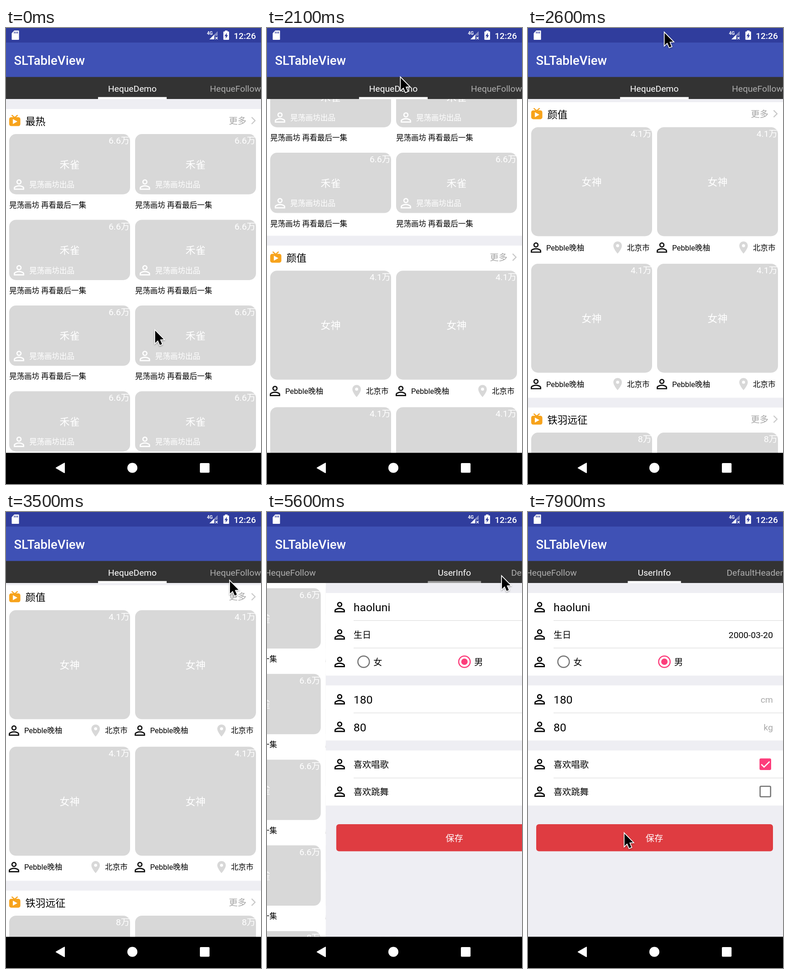
Animation of 559 by 1002 pixels, one loop 8 s. Source, as an HTML page with a canvas:

```html
<!DOCTYPE html>
<html lang="zh-CN">
<head>
<meta charset="utf-8">
<title>SLTableView</title>
<style>
html, body { margin: 0; width: 100%; height: 100%; overflow: hidden; background: #000; }
canvas { display: block; width: 559px; height: 1002px; }
</style>
</head>
<body>
<canvas id="stage"></canvas>
<script>
const W = 559, H = 1002, LOOP = 8000, STEP = 100;
const LEFT = -5, PAGE_W = 564, MID = 277;
const TOP = 156, BOTTOM = 933.5;
const GRAY = '#eeeef3', CARD = '#d8d8d8', PINK = '#fc3d7b', ORANGE = '#f7a31c';
const FONT = 'Roboto, "Noto Sans CJK SC", "Noto Sans CJK", sans-serif';
const SMALL = 16.5, BODY = 19.25, TITLE = 22, INPUT = 24.75;
const COLS = [7, 283];
const TABS = ['HequeDemo', 'HequeFollow', 'UserInfo', 'DefaultHeader'];

const canvas = document.getElementById('stage');
const g = canvas.getContext('2d');
const dpr = window.devicePixelRatio || 1;
canvas.width = W * dpr;
canvas.height = H * dpr;

const PERSON = new Path2D('M12 5.9a2.1 2.1 0 1 1 0 4.2a2.1 2.1 0 1 1 0-4.2m0 9c2.97 0 6.1 1.46 6.1 2.1v1.1H5.9V17c0-.64 3.13-2.1 6.1-2.1M12 4a4 4 0 1 0 0 8a4 4 0 1 0 0-8zm0 9c-2.67 0-8 1.34-8 4v3h16v-3c0-2.66-5.33-4-8-4z');
const PIN = new Path2D('M12 2C8.13 2 5 5.13 5 9c0 5.25 7 13 7 13s7-7.75 7-13c0-3.87-3.13-7-7-7zm0 9.5a2.5 2.5 0 1 1 0-5a2.5 2.5 0 1 1 0 5z');

// ---- helpers ----
const clamp01 = v => Math.min(1, Math.max(0, v));
const span = (t, a, b) => clamp01((t - a) / (b - a));
const smooth = u => u * u * (3 - 2 * u);
const mix = (a, b, u) => a + (b - a) * u;

function rect(x, y, w, h, color) {
  g.fillStyle = color;
  g.fillRect(x, y, w, h);
}

function roundRect(x, y, w, h, r, color) {
  g.fillStyle = color;
  g.beginPath();
  g.roundRect(x, y, w, h, r);
  g.fill();
}

function circle(x, y, r, color, line) {
  g.beginPath();
  g.arc(x, y, r, 0, Math.PI * 2);
  if (line) {
    g.lineWidth = line;
    g.strokeStyle = color;
    g.stroke();
  } else {
    g.fillStyle = color;
    g.fill();
  }
}

function trace(points) {
  g.beginPath();
  points.forEach(([x, y], i) => i ? g.lineTo(x, y) : g.moveTo(x, y));
}

function polygon(points, color) {
  trace(points);
  g.closePath();
  g.fillStyle = color;
  g.fill();
}

// Polygon with rounded corners, grown by half the line width.
function softPolygon(points, color, width) {
  polygon(points, color);
  g.lineJoin = 'round';
  g.strokeStyle = color;
  g.lineWidth = width;
  g.stroke();
  g.lineJoin = 'miter';
}

function polyline(points, color, width) {
  trace(points);
  g.strokeStyle = color;
  g.lineWidth = width;
  g.stroke();
}

function text(s, x, cy, size, color, align = 'left', weight = 400) {
  g.font = `${weight} ${size}px ${FONT}`;
  g.textAlign = align;
  g.fillStyle = color;
  g.fillText(s, x, cy + size * 0.37);
}

function icon(path, cx, cy, scale, color) {
  g.save();
  g.translate(cx, cy);
  g.scale(scale, scale);
  g.translate(-12, -12);
  g.fillStyle = color;
  g.fill(path, 'evenodd');
  g.restore();
}

const person = (cx, cy, color) => icon(PERSON, cx, cy, 1.43, color);

// ---- list pages ----
const SHOW = { h: 132.5, pitch: 188.4, rows: 4, tail: 50 };
const FACE = { h: 239.5, pitch: 300, rows: 2, tail: 55 };

function showCard(x, y, count) {
  roundRect(x, y, 265, SHOW.h, 15, CARD);
  text(count, x + 264, y + 14, BODY, '#fff', 'right');
  text('禾雀', x + 132.5, y + 66.5, TITLE, '#fff', 'center');
  person(x + 21.5, y + 111, '#fff');
  text('晃荡画坊出品', x + 44, y + 111, SMALL, '#fff');
  text('晃荡画坊 再看最后一集', x, y + 155.5, SMALL, '#000');
}

function faceCard(x, y, count) {
  const cy = y + 264.5;
  roundRect(x, y, 265, FACE.h, 15, CARD);
  text(count, x + 264, y + 14, BODY, '#fff', 'right');
  text('女神', x + 132.5, y + 120, TITLE, '#fff', 'center');
  person(x + 10.5, cy, '#111');
  text('Pebble晚柚', x + 33, cy, SMALL, '#000');
  icon(PIN, x + 189.5, cy, 1.33, CARD);
  text('北京市', x + 210, cy, SMALL, '#000');
}

function sectionHeader(y, title) {
  roundRect(7, y + 18, 24.5, 19.5, 4.5, ORANGE);
  polyline([[12.5, y + 13.5], [19, y + 19], [25.5, y + 13.5]], ORANGE, 2.4);
  polygon([[15, y + 22], [25, y + 27.5], [15, y + 33]], '#fff');
  text(title, 42.5, y + 26.5, TITLE, '#000');
  text('更多', 488.5, y + 25.5, BODY, '#a6a6a6');
  polyline([[538.5, y + 18], [546, y + 25.5], [538.5, y + 33]], '#c8c8c8', 2.2);
}

function section(y, title, kind, card, count) {
  const h = 55 + (kind.rows - 1) * kind.pitch + kind.h + kind.tail;
  rect(LEFT, y, PAGE_W, h, '#fff');
  sectionHeader(y, title);
  for (let r = 0; r < kind.rows; r++)
    for (const x of COLS) card(x, y + 55 + r * kind.pitch, count);
  return y + h + 21.6;
}

function demoPage(scroll) {
  rect(LEFT, TOP, PAGE_W, BOTTOM - TOP, GRAY);
  let y = 178 - scroll;
  y = section(y, '最热', SHOW, showCard, '6.6万');
  y = section(y, '颜值', FACE, faceCard, '4.1万');
  section(y, '铁羽远征', SHOW, showCard, '8万');
}

function followPage() {
  rect(LEFT, TOP, PAGE_W, BOTTOM - TOP, '#fff');
  for (let r = 0; r < 5; r++)
    for (const x of COLS) showCard(x, 167.4 + r * SHOW.pitch, r < 4 ? '6.6万' : '8万');
}

// ---- form page ----
function group(y, centers) {
  rect(LEFT, y, PAGE_W, centers.length * 60.5, '#fff');
  centers.forEach((cy, i) => {
    person(25.5, cy, '#000');
    if (i) rect(56, y + i * 60.4 - 0.5, W - 56, 1.2, '#dcdcdc');
  });
}

function infoPage() {
  rect(LEFT, TOP, PAGE_W, BOTTOM - TOP, GRAY);
  group(178, [209, 269, 329.5]);
  text('haoluni', 56, 208.5, INPUT, '#000');
  text('生日', 56, 269.5, BODY, '#000');
  text('2000-03-20', 537, 269.5, BODY, '#000', 'right');
  circle(78, 329, 12.6, '#757575', 2.5);
  text('女', 99.5, 330, BODY, '#000');
  circle(299, 329, 12.6, PINK, 2.5);
  circle(299, 329, 7, PINK);
  text('男', 320.5, 330, BODY, '#000');

  group(381, [411.5, 472]);
  text('180', 56, 412, INPUT, '#000');
  text('cm', 537, 412, BODY, '#aaa', 'right');
  text('80', 56, 473, INPUT, '#000');
  text('kg', 537, 473, BODY, '#aaa', 'right');

  group(524, [554, 614.5]);
  text('喜欢唱歌', 56, 554.5, BODY, '#000');
  text('喜欢跳舞', 56, 615, BODY, '#000');
  roundRect(507.5, 541.5, 25.5, 25.5, 3, PINK);
  polyline([[511.5, 554.5], [517.5, 560.5], [529.5, 548.5]], '#fff', 2.6);
  g.beginPath();
  g.roundRect(508.8, 602.8, 23, 23, 2);
  g.strokeStyle = '#757575';
  g.lineWidth = 2.6;
  g.stroke();

  roundRect(18, 686, 519, 59.5, 6, '#df3c41');
  text('保存', MID, 716.5, BODY, '#fff', 'center');
}

// ---- fixed bars ----
function statusBar() {
  rect(0, 0, W, 32, '#303d9d');
  softPolygon([[13.5, 12], [18.5, 6.5], [27.5, 6.5], [27.5, 25], [13.5, 25]], '#fff', 2);
  for (let i = 0; i < 3; i++) rect(17.5 + i * 3.4, 8, 1.6, 4, '#303d9d');
  text('4G', 440.5, 11, 10, '#fff', 'left', 700);
  polygon([[464, 7], [464, 17], [457, 17], [457, 25], [446, 25]], 'rgba(255,255,255,.4)');
  polygon([[456.5, 14.5], [456.5, 25], [446, 25]], '#fff');
  polyline([[459, 19.5], [464, 24.8]], '#fff', 1.6);
  polyline([[464, 19.5], [459, 24.8]], '#fff', 1.6);
  roundRect(476.5, 7.5, 12.5, 18.5, 1.5, '#fff');
  rect(480, 5.5, 5.5, 3, '#fff');
  polygon([[484.2, 10.5], [479, 18], [482, 18], [481.4, 23.5], [486.6, 15.8], [483.6, 15.8]], '#303d9d');
  text('12:26', 548, 16.5, BODY, '#fff', 'right', 500);
}

function toolbar() {
  rect(0, 32, W, 76, '#3f51b5');
  text('SLTableView', 17.5, 70.5, 27.5, '#fff', 'left', 500);
}

// The middle title follows the page; its neighbours stick to the edges.
function tabStrip(pos) {
  rect(0, 107.6, W, TOP - 107.6, '#333');
  g.font = `400 ${BODY}px ${FONT}`;
  const width = i => g.measureText(TABS[i]).width;
  const cur = Math.round(pos), off = pos - cur, gap = 88;
  const cx = MID - PAGE_W * off, half = width(cur) / 2;
  const dim = 'rgba(255,255,255,.6)';
  if (cur > 0) {
    const x = Math.min(LEFT, cx - half - gap - width(cur - 1));
    text(TABS[cur - 1], x, 133, BODY, dim);
  }
  if (cur < TABS.length - 1) {
    const x = Math.max(W, cx + half + gap + width(cur + 1));
    text(TABS[cur + 1], x, 133, BODY, dim, 'right');
  }
  text(TABS[cur], cx, 133, BODY, '#fff', 'center');
  g.globalAlpha = 1 - 2 * Math.abs(off);
  rect(cx - half - 22, 151.7, half * 2 + 44, 4.8, '#fff');
  g.globalAlpha = 1;
}

function navBar() {
  rect(0, BOTTOM, W, H - BOTTOM, '#000');
  softPolygon([[110, 966.7], [128, 956.3], [128, 977.1]], '#fff', 2);
  circle(277, 966.5, 11, '#fff');
  roundRect(425, 956, 21.2, 21.2, 2, '#fff');
}

function cursor([x, y]) {
  g.save();
  g.translate(x + 1, y + 2);
  trace([[0, 0], [0, 27], [6, 21.3], [10.4, 31.5], [15, 29.6], [10.6, 19.6], [18.6, 19]]);
  g.closePath();
  g.shadowColor = 'rgba(0,0,0,.35)';
  g.shadowBlur = 3 * dpr;
  g.shadowOffsetY = 1.5 * dpr;
  g.strokeStyle = '#fff';
  g.lineWidth = 3.4;
  g.stroke();
  g.shadowColor = 'transparent';
  g.fillStyle = '#000';
  g.fill();
  g.restore();
}

// ---- motion ----
// Each move: start, end, control point, destination.
const MOVES = [
  [500, 1350, [325, 545], [297, 524]],
  [1850, 2200, [294, 260], [291, 6.5]],
  [2500, 3400, [400, 40], [490, 150]],
  [3500, 3700, [490, 143], [490, 137.5]],
  [4900, 5400, [502, 138], [514, 140]],
  [6200, 7700, [330, 370], [210.5, 705]]
];

function cursorAt(t) {
  let at = [326, 663];
  for (const [a, b, mid, to] of MOVES) {
    if (t <= a) break;
    const u = smooth(span(t, a, b));
    at = at.map((v, i) => mix(mix(v, mid[i], u), mix(mid[i], to[i], u), u));
  }
  return at;
}

const scrollAt = t => 841.5 * (1 - Math.pow(1 - span(t, 1850, 2700), 2.8));
const slide = u => 1 - Math.pow(1 - u, 5);
const pageAt = t => slide(span(t, 3750, 3950)) + slide(span(t, 5550, 5750));

function draw(t) {
  g.setTransform(dpr, 0, 0, dpr, 0, 0);
  const pos = pageAt(t);
  const pages = [() => demoPage(scrollAt(t)), followPage, infoPage];
  g.save();
  g.beginPath();
  g.rect(0, TOP, W, H - TOP);
  g.clip();
  pages.forEach((page, i) => {
    if (Math.abs(i - pos) >= 1) return;
    g.save();
    g.translate(PAGE_W * (i - pos), 0);
    page();
    g.restore();
  });
  g.restore();
  statusBar();
  toolbar();
  tabStrip(pos);
  navBar();
  cursor(cursorAt(t));
}

const start = performance.now();
function tick() {
  const t = (performance.now() - start) % LOOP;
  draw(Math.floor(t / STEP) * STEP);
  requestAnimationFrame(tick);
}
tick();
</script>
</body>
</html>
```
